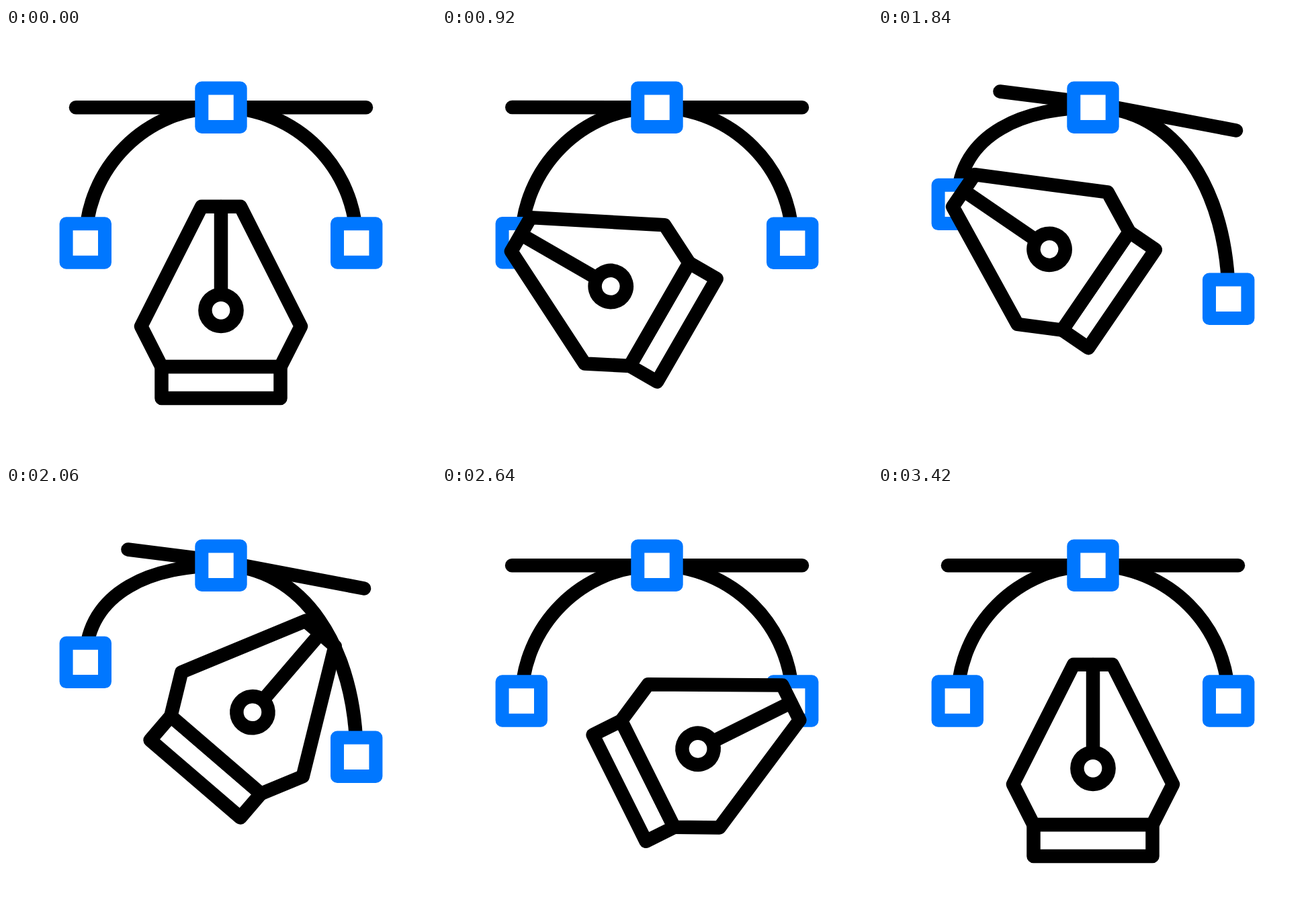
An HTML page for the animation above (3600 ms loop, 640 by 640 pixels).

```html
<!DOCTYPE html>
<html lang="en">
<head>
<meta charset="utf-8">
<title>Pen tool</title>
<style>
  html, body { margin: 0; width: 100%; height: 100%; overflow: hidden; background: #fff; }
  svg { display: block; width: 100vw; height: 100vh; }
  .ink { fill: none; stroke: #000; stroke-width: 20.5; stroke-linecap: round; stroke-linejoin: round; }
  .paper { fill: #fff; }
  .node { fill: #fff; stroke: #0077ff; stroke-width: 20; stroke-linejoin: round; }
</style>
</head>
<body>
<svg viewBox="0 0 640 640">
  <path id="arc" class="ink"/>
  <path id="bar" class="ink"/>
  <path id="left" class="node" d="M-28.7-28.7h57.4v57.4h-57.4z"/>
  <path id="right" class="node" d="M-28.7-28.7h57.4v57.4h-57.4z"/>
  <path class="node" transform="translate(320 118.2)" d="M-28.7-28.7h57.4v57.4h-57.4z"/>
  <!-- The pen's local origin is the middle of its base. -->
  <g id="pen">
    <path class="ink paper" d="M-88.5-47h177V0h-177z"/>
    <path class="ink paper" d="M-29-285.2H29L119-107 88.5-47h-177L-119-107z"/>
    <path class="ink" d="M0-285V-154"/>
    <circle class="ink paper" cy="-130.7" r="23.6"/>
  </g>
</svg>
<script>
const LOOP = 3600;
const el = id => document.getElementById(id);
const lerp = (a, b, p) => a + (b - a) * p;

function bezier(x1, x2) {
  return u => {
    if (u <= 0) return 0;
    if (u >= 1) return 1;
    let lo = 0, hi = 1, t = 0.5;
    for (let i = 0; i < 24; i++) {
      t = (lo + hi) / 2;
      const r = 1 - t;
      const x = 3 * r * r * t * x1 + 3 * r * t * t * x2 + t * t * t;
      if (x < u) lo = t; else hi = t;
    }
    return t * t * (3 - 2 * t);
  };
}

const smooth = bezier(0.35, 0.4);
const swing = bezier(0.35, 0.42);
const settle = bezier(0.3, 0.25);

// Pen poses: base x, base y, angle
const rest = [320, 551, 0];
const leftLow = [364.4, 450, -60];
const leftHigh = [366.3, 401.5, -60];
const rightLow = [244.2, 448.2, 80.3];
const rightHigh = [264.1, 449.6, 63.5];

// start, end, easing, from, to, sideways bend of the path
const moves = [
  [0, 730, smooth, rest, leftLow],
  [900, 1500, smooth, leftLow, leftHigh],
  [1790, 2288, swing, leftHigh, rightLow, [7.5, 2, 0]],
  [2288, 2650, smooth, rightLow, rightHigh],
  [2866, 3424, settle, rightHigh, rest]
];

function progress(time, [start, end, ease]) {
  return ease((time - start) / (end - start));
}

function penPose(time) {
  let move = moves[0];
  for (const m of moves) if (time >= m[0]) move = m;
  const p = progress(time, move);
  const [, , , from, to, bend = [0, 0, 0]] = move;
  return from.map((v, i) => lerp(v, to[i], p) + bend[i] * 2 * p * (1 - p));
}

function draw(time) {
  const pull = progress(time, moves[1]) - progress(time, moves[3]);
  const mix = (a, b) => lerp(a, b, pull).toFixed(2);
  const yl = mix(320, 262.4);
  const yr = mix(320, 403.3);

  el("arc").setAttribute("d",
    `M118.3 ${yl}C118.3 ${mix(208.4, 153)} ${mix(208.4, 224)} 118.2 320 118.2` +
    `C${mix(431.6, 441)} 118.2 521.7 ${mix(208.4, 240)} 521.7 ${yr}`);
  el("bar").setAttribute("d",
    `M${mix(104, 181.5)} ${mix(118.2, 94.5)}L320 ${mix(118.2, 112)} ` +
    `${mix(536, 533)} ${mix(118.2, 152.5)}`);
  el("left").setAttribute("transform", `translate(118.3 ${yl})`);
  el("right").setAttribute("transform", `translate(521.7 ${yr})`);

  const [x, y, angle] = penPose(time);
  el("pen").setAttribute("transform", `translate(${x} ${y}) rotate(${angle})`);
}

const begin = performance.now();
function tick() {
  draw((performance.now() - begin) % LOOP);
  requestAnimationFrame(tick);
}
tick();
</script>
</body>
</html>
```
